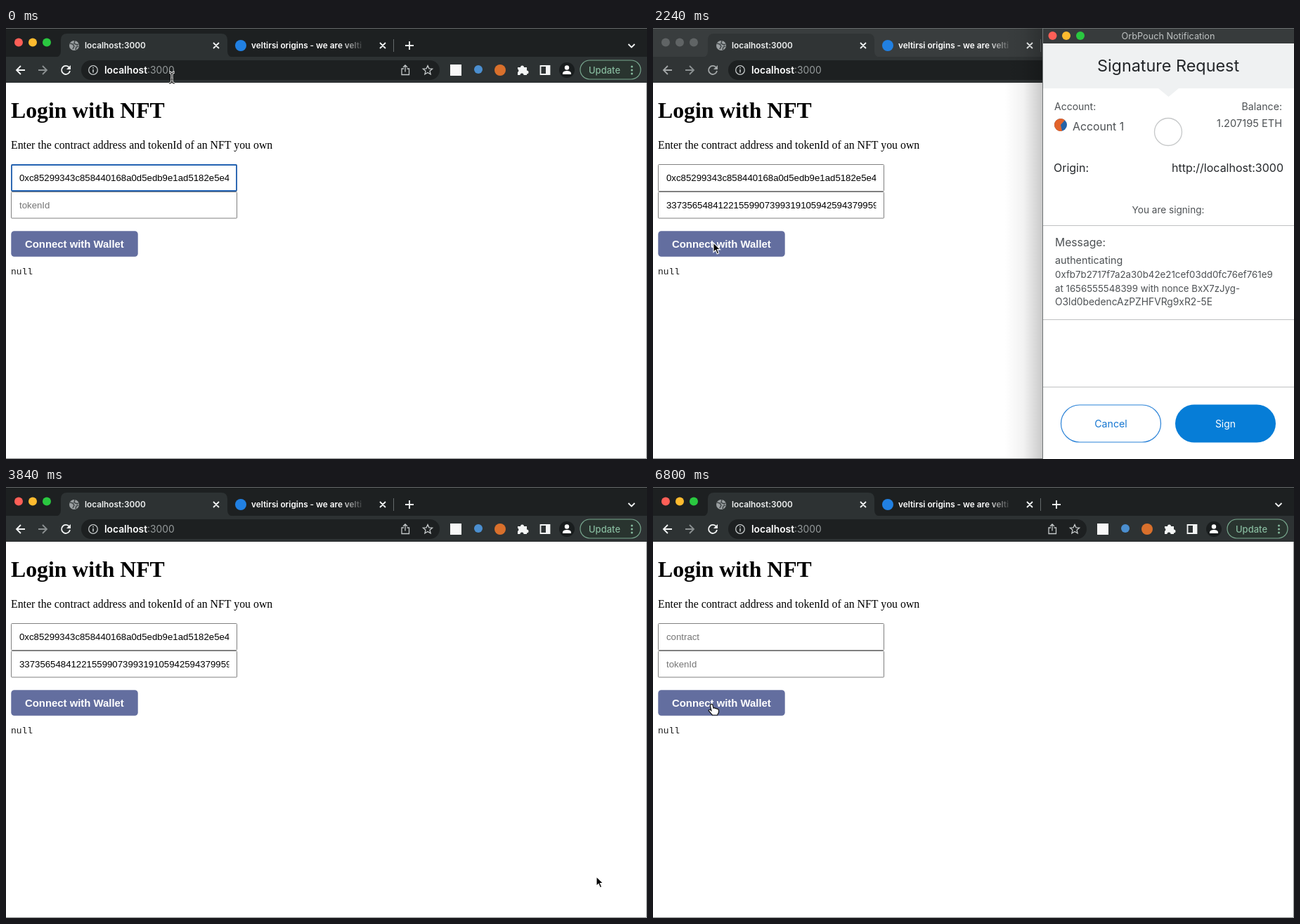
Write an HTML page that moves like this. It is 912 px wide and 614 px high and loops after 6.88 s.

```html
<!DOCTYPE html>
<html lang="en">
<head>
<meta charset="utf-8">
<title>Login with NFT</title>
<style>
html, body { margin: 0; width: 100%; height: 100%; overflow: hidden; background: #fff; }
svg { display: block; width: 912px; height: 614px; }
text { white-space: pre; }
.ui { font-family: Inter, "Liberation Sans", sans-serif; }
.serif { font-family: "Liberation Serif", "Times New Roman", serif; }
.arial { font-family: "Liberation Sans", Arial, sans-serif; }
.mono { font: 12.9px "Liberation Mono", "Courier New", monospace; fill: #1c1c1c; }
.field { font-size: 13.23px; }
.hint { fill: #757575; }
.btn { font-size: 14.88px; font-weight: 700; fill: #fff; }
.tab { font-size: 11.8px; font-weight: 600; }
.line { fill: none; stroke: currentColor; stroke-width: 1.8; }
.thin { fill: none; stroke: currentColor; stroke-width: 1.3; }
.box { fill: #fff; stroke: #808080; }
.focus { fill: #fff; stroke: #2262b2; stroke-width: 1.8; }
.mid { text-anchor: middle; }
.end { text-anchor: end; }

/* Browser chrome dims while the wallet window has focus */
.strip { fill: #1d2021; }
.bar { fill: #2d3233; }
.icons { color: #f3f5f5; }
.update { fill: #86b99d; }
.pill { fill: #29342f; stroke: #78a78e; stroke-width: 1.2; }
.light:nth-child(1) { fill: #fe5f57; }
.light:nth-child(2) { fill: #febb2f; }
.light:nth-child(3) { fill: #2ac840; }
.idle .strip { fill: #393d3e; }
.idle .bar { fill: #303435; }
.idle .icons { color: #a3a7a8; }
.idle .update { fill: #a0a5a5; }
.idle .chrome .light { fill: #606465; }

#popup { transform-origin: 733px 308px; }
.hide { visibility: hidden; }
</style>
</head>
<body>
<svg id="stage" viewBox="0 0 912 614">
  <defs>
    <linearGradient id="fade"><stop offset=".8" stop-color="#fff"/><stop offset="1" stop-color="#fff" stop-opacity=".15"/></linearGradient>
    <linearGradient id="shade"><stop offset="0" stop-opacity="0"/><stop offset=".5" stop-opacity=".05"/><stop offset="1" stop-opacity=".21"/></linearGradient>
    <clipPath id="inner"><path d="M19 195H317.5V270H19z"/></clipPath>
  </defs>
  <rect width="912" height="614" fill="#fff"/>

  <g class="chrome ui">
    <rect class="strip" width="912" height="42"/>
    <rect class="bar" y="41" width="912" height="37"/>
    <path class="bar" d="M68 42Q78 42 78 33V17Q78 8 87 8H306Q315 8 315 17V33Q315 42 325 42z"/>
    <path d="M0 .5H912" stroke="#65696a"/>
    <g><circle class="light" cx="18" cy="20.5" r="6"/><circle class="light" cx="38" cy="20.5" r="6"/><circle class="light" cx="58" cy="20.5" r="6"/></g>

    <circle cx="97" cy="25" r="7" fill="#9ba0a2"/>
    <path d="M91 22l4 1 2 3-2 4M98 18l-1 4 4 2 2-1M99 31l1-4 3-1" fill="none" stroke="#43484a" stroke-width="1.6"/>
    <text class="tab" x="112" y="29" fill="#eef0f0">localhost:3000</text>
    <circle cx="334" cy="25" r="8" fill="#2180e2"/>
    <text class="tab" x="349" y="29" fill="url(#fade)">veltirsi origins - we are velti</text>
    <path d="M551.5 16V34" stroke="#656a6b"/>
    <path class="line" color="#f1f3f3" d="M295 21l8 8m0-8l-8 8M532 21l8 8m0-8l-8 8M568 25H580M574 19V31M885.5 23l4.5 4.5 4.5-4.5"/>

    <rect x="107" y="46" width="510" height="28" rx="14" fill="#1d2021"/>
    <g class="icons">
      <path class="line" d="M27 60H15m6-6l-6 6 6 6"/>
      <path class="line" d="M90 56.5A6 6 0 1 0 91 61"/>
      <path d="M92 53V59H86z" fill="currentColor"/>
      <path d="M728 56h4a2.5 2.5 0 1 1 5 0h4v4.5a2.5 2.5 0 1 1 0 5V67h-4.5a2.5 2.5 0 0 0-5 0H728v-4a2.5 2.5 0 0 0 0-4.5z" fill="currentColor"/>
      <path class="line" d="M760.5 54H773.5V66H760.5z"/><path d="M768 54h6v12h-6z" fill="currentColor"/>
    </g>
    <path d="M46 60H58m-6-6l6 6-6 6" fill="none" stroke="#8b9091" stroke-width="1.8"/>
    <g color="#c4c8c9">
      <circle class="thin" cx="124" cy="60" r="6.3"/>
      <path d="M124 59V63.5M124 56V57.6" stroke="currentColor" stroke-width="1.6"/>
      <path class="thin" d="M566 58h-3v8.5h10.5V58h-3M568 62.5V53m-3 3l3-3 3 3"/>
      <path class="thin" d="M600 53.5l1.900 4.300 4.700.4-3.600 3.100 1.100 4.600-4.100-2.500-4.100 2.500 1.100-4.600-3.600-3.100 4.700-.4z"/>
    </g>
    <text x="140" y="65" font-size="13.8" fill="#969b9c"><tspan font-weight="600" fill="#fff">localhost</tspan>:3000</text>
    <rect x="632" y="52" width="16" height="16" fill="#f8f8f8"/>
    <circle cx="672" cy="59" r="6" fill="#4b8fd0"/>
    <circle cx="703" cy="60" r="8" fill="#d9702c"/>
    <g id="badge"><rect x="705" y="62" width="12" height="12" rx="2" fill="#1a73e8"/><text class="mid" x="711" y="71.5" font-size="9.5" fill="#fff">1</text></g>
    <circle cx="798" cy="60" r="11" fill="#191d1e"/>
    <circle cx="798" cy="56.5" r="3.2" fill="#fff"/><path d="M792 66v-2q1-3 6-3t6 3v2z" fill="#fff"/>
    <rect class="pill" x="817" y="46" width="86" height="27" rx="13.5"/>
    <g class="update"><text x="829" y="65" font-size="13" font-weight="500">Update</text>
      <circle cx="890.5" cy="55" r="1.5"/><circle cx="890.5" cy="60" r="1.5"/><circle cx="890.5" cy="65" r="1.5"/></g>
  </g>

  <text class="serif" x="7" y="128" font-size="31.75" font-weight="700">Login with NFT</text>
  <text class="serif" x="7" y="172" font-size="15.87">Enter the contract address and tokenId of an NFT you own</text>

  <g id="form" class="arial">
    <rect class="box" x="7.5" y="233.5" width="321" height="37.5" rx="1"/>
    <rect class="box" x="7.5" y="194.5" width="321" height="38" rx="1"/>
    <rect id="focus1" class="focus" x="8" y="195" width="320" height="37" rx="1.5"/>
    <rect id="focus2" class="focus" x="8" y="233.5" width="320" height="37" rx="1.5"/>
    <g class="field" clip-path="url(#inner)">
      <text id="contract" x="19" y="217.5">0xc85299343c858440168a0d5edb9e1ad5182e5e45</text>
      <text id="hint1" class="hint" x="19" y="217.5">contract</text>
      <text id="hint2" class="hint" x="19" y="256.5">tokenId</text>
      <text id="token" x="19" y="256.5">33735654841221559907399319105942594379959993133494876178857859290985544537880</text>
      <text id="tail" class="end" x="317" y="256.5">33735654841221559907399319105942594379959993133494876178857859290985544537880</text>
    </g>
    <path id="caret" d="M317 245V259" stroke="#000"/>
    <rect x="7.3" y="289.3" width="180.4" height="36.5" rx="4.5" fill="#636e9f"/>
    <text class="btn" x="27" y="313">Connect with Wallet</text>
    <text class="mono" x="7" y="351">null</text>
  </g>

  <g id="result">
    <ellipse cx="56.5" cy="230" rx="21.5" ry="21" fill="#202224"/>
    <rect x="7.3" y="297.2" width="120" height="36.5" rx="4.5" fill="#b9b9b9"/>
    <text class="btn arial" x="27" y="321">Disconnect</text>
    <g id="json" class="mono"></g>
  </g>
  <path d="M911.5 78V613.5H0" fill="none" stroke="#8d9090"/>

  <g id="shadow"><path d="M500 0H554V614H500z" fill="url(#shade)"/></g>
  <g id="popup" class="ui" fill="#24272a">
    <rect x="554" width="358" height="614" fill="#fff"/>
    <rect x="554" width="358" height="22" fill="#373b3c"/>
    <path d="M554 .5H912" stroke="#6b6f70"/>
    <g><circle class="light" cx="568.5" cy="11" r="6"/><circle class="light" cx="588" cy="11" r="6"/><circle class="light" cx="608" cy="11" r="6"/></g>
    <text class="mid" x="733" y="16" font-size="12.7" fill="#bfc3c3">OrbPouch Notification</text>
    <path d="M554 22H912V86H748L733.5 98 719 86H554z" fill="#eff1f2"/>
    <text class="mid" x="733" y="62" font-size="23.4">Signature Request</text>
    <g fill="#4d5154">
      <text x="571" y="117" font-size="14">Account:</text>
      <text class="end" x="895" y="117" font-size="14.2">Balance:</text>
      <text x="597" y="146" font-size="15.8">Account 1</text>
      <text class="end" x="895" y="141" font-size="14.6">1.207195 ETH</text>
      <text class="mid" x="733" y="264" font-size="13.6">You are signing:</text>
      <text x="572" y="311" font-size="15.7">Message:</text>
      <text x="572" y="336" font-size="14.3">authenticating</text>
      <text x="572" y="356" font-size="13.3">0xfb7b2717f7a2a30b42e21cef03dd0fc76ef761e9</text>
      <text x="572" y="375.5" font-size="13.25">at 1656555548399 with nonce BxX7zJyg-</text>
      <text x="572" y="394.5" font-size="13.8">O3ld0bedencAzPZHFVRg9xR2-5E</text>
    </g>
    <circle cx="580" cy="138" r="9" fill="#2463a8"/>
    <path d="M580 138L586 131.3A9 9 0 1 0 582 146.8z" fill="#e2632b"/>
    <circle cx="733" cy="148" r="19.5" fill="#fff" stroke="#c6c8c9" stroke-width="1.3"/>
    <text x="570" y="205" font-size="16">Origin:</text>
    <text class="end" x="897" y="205" font-size="16">http://localhost:3000</text>
    <path d="M554 281.5H912M554 415.5H912M554 511.5H912" stroke="#bfc1c2"/>
    <rect x="580.5" y="537" width="142" height="53" rx="26.5" fill="#fff" stroke="#2b83d8" stroke-width="1.2"/>
    <rect x="743" y="536.5" width="143" height="54" rx="27" fill="#067dd7"/>
    <text class="mid" x="651.5" y="568.5" font-size="14.2" fill="#1576d1">Cancel</text>
    <text class="mid" x="814.5" y="568.5" font-size="14" fill="#fff">Sign</text>
    <path d="M554.5 0V614" stroke="#6f7374"/>
  </g>
  <rect id="seed" x="722" y="290" width="23" height="38" fill="#eef0f0"/>

  <g id="cursor">
    <g id="beam" fill="none">
      <path d="M-4-8Q0-8 0-4Q0-8 4-8M0-5V5M-4 8Q0 8 0 4Q0 8 4 8M-2 2H2" stroke="#fff" stroke-width="3"/>
      <path d="M-4-8Q0-8 0-4Q0-8 4-8M0-5V5M-4 8Q0 8 0 4Q0 8 4 8M-2 2H2" stroke="#222" stroke-width="1.2"/>
    </g>
    <path id="arrow" d="M0 0V13.5L3.100 10.500 5.300 15.700 7.700 14.700 5.500 9.600H9.700z" fill="#000" stroke="#fff" stroke-width="1.1"/>
    <path id="hand" d="M-1 0Q1-1.500 2 .5L3 5Q5 4 5.500 5.500Q7.500 4.500 8 6.300Q10.500 5.500 10.500 8.500V11L8.500 15H1.500L-4 8.500Q-3.500 6 0 8.500L-1.700 1.500Q-1.700.4-1 0z" fill="#fff" stroke="#111" stroke-width="1.2"/>
  </g>
</svg>
<script>
const LOOP = 6880, STEP = 80;
const $ = id => document.getElementById(id);

const json = JSON.stringify({
  account: "0xfb7b2717f7a2a30b42e21cef03dd0fc76ef761e9",
  auth: {
    tokenURI: "ipfs://bafkreicksw2dqwddronm4vms4cvqkmgt6wcbtzerhp6iutpwm4yukf6xda",
    image: "https://ipfs.io/ipfs/bafkreicl5lh3ctfoj3h322fihfwlwlapjwiyubwgjmb7zzw63gqqjglpya",
    owner: { contract: $("contract").textContent, tokenId: $("token").textContent }
  }
}, null, 2);
json.split("\n").forEach((line, i) => {
  const row = document.createElementNS("http://www.w3.org/2000/svg", "text");
  row.setAttribute("x", 7);
  row.setAttribute("y", 359 + i * 14.9);
  row.textContent = line;
  $("json").append(row);
});

// Pointer stops: time, x, y
const path = [
  [0, 236, 71], [160, 236, 71], [560, 188, 246], [800, 188, 240], [1120, 188, 240],
  [1440, 86, 306], [2240, 86, 306], [2520, 834, 538], [3040, 834, 538],
  [3360, 840, 555], [5520, 840, 555], [5920, 83, 310], [6880, 83, 310]
];

function pointer(t) {
  const i = path.findIndex(p => p[0] > t);
  const [t0, x0, y0] = path[i - 1], [t1, x1, y1] = path[i];
  const k = (t - t0) / (t1 - t0), e = k * k * (3 - 2 * k);
  return [x0 + (x1 - x0) * e, y0 + (y1 - y0) * e];
}

const show = (id, on) => $(id).classList.toggle("hide", !on);
const within = (t, a, b) => t >= a && t < b;

function draw(t) {
  const [x, y] = pointer(t);
  const signed = within(t, 4480, 6080), reset = t >= 6080;
  const pasted = within(t, 880, 6080), editing = within(t, 640, 1600);

  $("stage").classList.toggle("idle", within(t, 1920, 3120));
  show("badge", within(t, 1920, 3040));
  show("form", !signed);
  show("result", signed);
  show("focus1", t < 640);
  show("focus2", editing);
  show("contract", !reset);
  show("hint1", reset);
  show("hint2", !pasted);
  show("tail", pasted && editing);
  show("token", pasted && !editing);
  show("caret", within(t, 880, 1360));

  show("popup", within(t, 2160, 3040));
  show("shadow", within(t, 2240, 3040));
  show("seed", within(t, 2080, 2160));
  $("popup").style.transform = t < 2240 ? "scale(.72)" : "none";

  const hand = within(t, 1360, 1920) || within(t, 2480, 3040) || t >= 5920;
  const beam = t < 1360;
  show("beam", beam);
  show("hand", hand);
  show("arrow", !beam && !hand);
  $("cursor").setAttribute("transform", `translate(${x.toFixed(1)} ${y.toFixed(1)})`);
}

const start = performance.now();
function tick() {
  const t = (performance.now() - start) % LOOP;
  draw(Math.floor(t / STEP) * STEP);
  requestAnimationFrame(tick);
}
draw(0);
requestAnimationFrame(tick);
</script>
</body>
</html>
```
